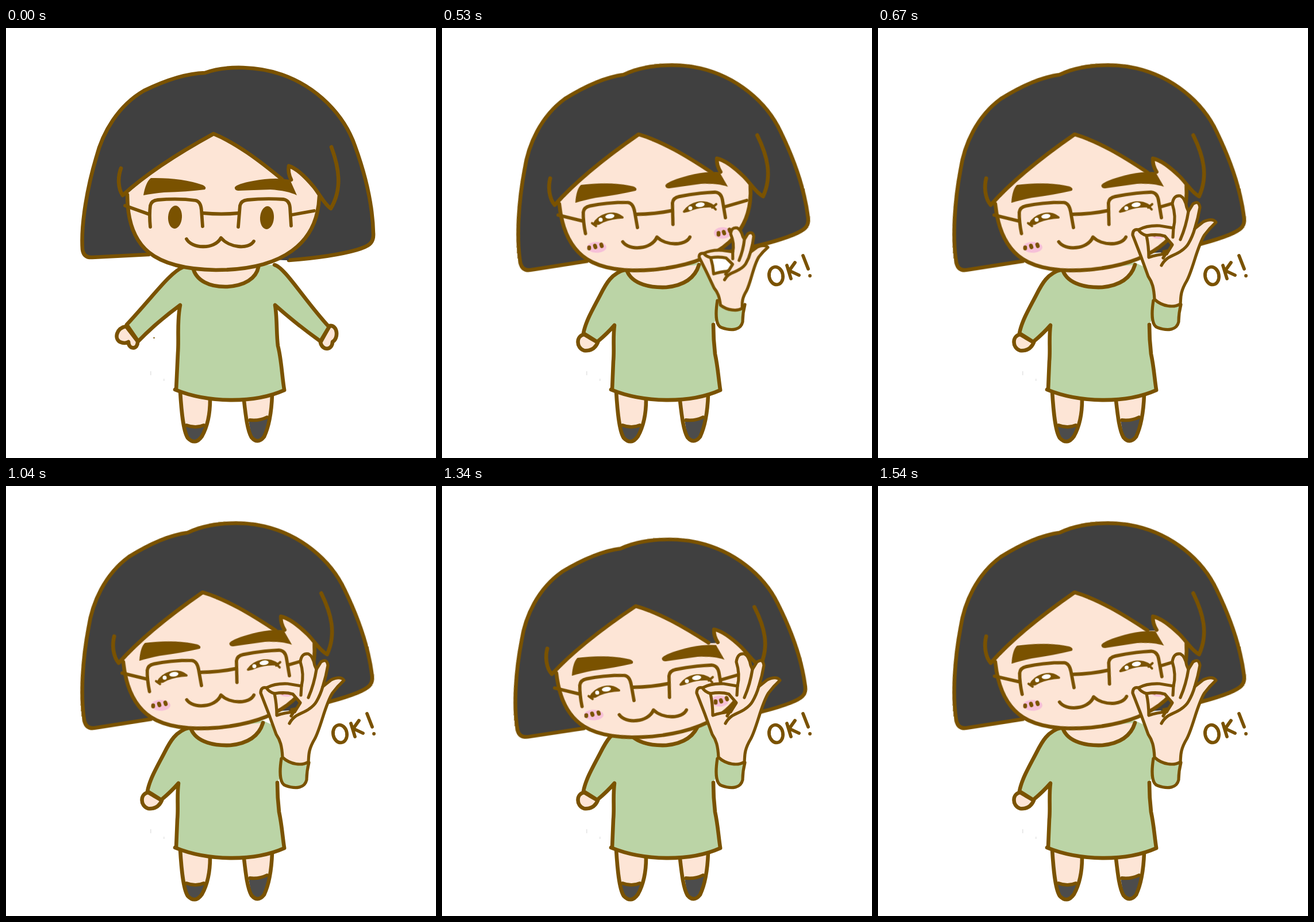
An HTML page without scripts for the animation above (2.14 s loop, 748 px wide and 748 px high).

```html
<!DOCTYPE html>
<html lang="en">
<head>
<meta charset="utf-8">
<title>OK!</title>
<style>
  html, body { margin: 0; width: 100%; height: 100%; overflow: hidden; background: #fff; }
  svg { display: block; width: 100%; height: 100%; }

  :root { --line: #7a5200; --hair: #404040; --skin: #fde5d6; --shirt: #bbd4a6; }
  .ink { fill: none; stroke: var(--line); stroke-width: 6.6; stroke-linecap: round; stroke-linejoin: round; }
  .hair { fill: var(--hair); }
  .skin { fill: var(--skin); }
  .shirt { fill: var(--shirt); }
  .sock { fill: #4c4c4c; }
  .solid { fill: var(--line); }
  .pink { fill: #f6c0d8; }
  .light { fill: #fff; }
  .plain { stroke: none; }
  .thin { stroke-width: 5.8; }
  .fine { stroke-width: 5.2; }
  .lash { stroke-width: 4; }
  .hand path { vector-effect: non-scaling-stroke; }

  .calm, .okay, .tilt, .squash, .nod, .hand { animation: 2140ms step-end infinite; }
  .calm { animation-name: calm; }
  .okay { animation-name: okay; }
  .tilt { animation-name: tilt; transform-origin: 375px 366px; }
  .squash { animation-name: squash; }
  .nod { animation-name: nod; }
  .hand { animation-name: raise; }

  @keyframes calm { 0% { visibility: visible; } 24.766%, 100% { visibility: hidden; } }
  @keyframes okay { 0% { visibility: hidden; } 24.766%, 100% { visibility: visible; } }
  @keyframes tilt { 0% { transform: none; } 24.766%, 100% { transform: translateY(-1.5px) rotate(-6deg); } }
  @keyframes squash {
    0%, 48.598%, 71.962%, 100% { transform: none; }
    39.252%, 62.616% { transform: matrix(1, 0, 0, .964, -5, 30.6); }
  }
  @keyframes nod {
    0%, 48.598% { transform: none; }
    39.252%, 62.616% { transform: translate(-6px, 26px); }
    71.962%, 100% { transform: matrix(1, -.013, .013, 1, -3.5, 8); }
  }
  @keyframes raise {
    0%, 24.766% { transform: matrix(.831, -.006, .048, .745, 62, 133.3); }
    28.037% { transform: matrix(.915, -.003, .024, .872, 31, 66.6); }
    31.308%, 100% { transform: none; }
  }
</style>
</head>
<body>
<svg viewBox="0 0 748 748" role="img" aria-label="A girl with glasses makes an OK sign">
  <g fill="#e4e4e4">
    <rect x="251" y="597" width="1.5" height="7"/>
    <rect x="274" y="610" width="1.5" height="4"/>
  </g>

  <!-- legs -->
  <g class="ink">
    <path class="skin plain" d="M303 634C305 665 308 700 316 713Q329 727 341 710C352 690 355 665 355 645ZM414 645C417 675 420 700 427 712Q438 725 449 711C459 690 462 665 463 636Z"/>
    <path class="sock plain" d="M312 693Q330 698 347 691Q345 704 341 710Q329 727 316 713ZM422 682Q440 685 457 676Q454 702 449 711Q438 725 427 712Z"/>
    <path d="M303 632C305 665 308 700 316 713Q329 727 341 710C352 690 355 665 355 647M414 648C417 675 420 700 427 712Q438 725 449 711C459 690 462 665 463 638"/>
    <path class="thin" d="M314 691Q330 697 344 691M424 682Q440 684 454 677"/>
  </g>

  <!-- arms spread -->
  <g class="ink calm">
    <circle class="solid plain" cx="257.500" cy="539" r="1.2"/>
    <path class="skin" d="M209 519C192 522 188 540 198 546Q207 550 213 546C213 560 230 560 229 545ZM563 518C577 516 579 540 568 546C567 562 550 561 547 547Z"/>
    <path class="shirt plain" d="M308 416C285 425 255 468 210 516L230 545L303 482L296 629C350 652 430 654 484 629L474 555L468 482L547 545L562 520C520 475 485 416 465 412Z"/>
    <path class="skin" d="M325 416C330 440 355 451 385 450C415 448 435 436 439 416"/>
    <path d="M308 416C285 425 255 468 210 516L230 545Q262 512 303 482C297 510 301 540 299 565L296 629M467 412C485 416 520 475 562 520L547 545Q505 515 468 482C472 505 470 530 473 553C479 575 480 605 484 629"/>
  </g>

  <!-- one arm up -->
  <g class="ink okay">
    <path class="skin" d="M247 533C233 536 233 556 247 561Q264 563 271 547Z"/>
    <path class="shirt plain" d="M318 420C295 426 285 445 275 465C262 490 250 510 246 531L270 546L300 517L296 629C350 652 430 654 484 629L474 565L472 515L481 500L478 440L462 415L447 408Z"/>
    <path class="skin" d="M322 423C332 447 365 452 390 451C420 448 440 435 447 412"/>
    <path d="M320 420C295 426 285 445 275 465C262 490 250 510 246 531L270 546Q287 532 300 517C297 540 300 560 298 580L296 629M472 516C472 535 473 550 475 567C480 590 481 610 484 629"/>
    <path class="shirt fine" d="M479 474C475 500 477 518 486 521C505 528 520 525 523 511Q523 496 527 481"/>
  </g>

  <path class="ink" d="M294 629C350 652 430 654 484 630"/>

  <!-- hair and face -->
  <g class="squash"><g class="tilt">
    <g class="ink">
      <path class="hair" d="M248 394L150 399Q135 400 133 385C130 340 142 275 157 225C168 182 195 135 240 109C275 92 310 79 346 78C385 64 440 67 480 81C540 102 588 150 607 205C627 260 638 310 639 358C640 375 630 380 610 386C575 396 530 401 492 404"/>
      <path class="hair plain" d="M248 394L492 404L480 330H260Z"/>
      <path class="skin plain" d="M361 184C400 200 440 230 482 264L497 265L492 240C512 248 530 268 545 293C542 374 482 421 365 421C260 419 211 385 211 288C260 245 310 212 361 184Z"/>
      <path d="M545 293C542 374 482 421 365 421C260 419 211 385 211 290"/>
      <path d="M200 244C194 260 195 280 203 291C250 248 310 212 361 184C400 200 440 230 480 263"/>
      <path d="M566 207C580 245 585 280 565 314C553 306 545 288 535 276C520 258 505 244 492 240Q490 252 496 264"/>
    </g>
    <g class="okay" transform="rotate(6 375 366)">
      <ellipse class="pink" cx="269" cy="383" rx="17" ry="9.500"/>
      <ellipse class="pink" cx="488" cy="358" rx="15" ry="10"/>
      <path class="ink" d="M256 383v2M266 380l1 3M277 378l1 3M481 358v3M490 356l1 3M500 352l1 3"/>
    </g>
  </g></g>

  <!-- features -->
  <g class="nod"><g class="tilt">
    <path class="solid" d="M239 291Q243 268 252 261Q305 260 342 273Q350 277 346 281Q315 285 275 286Q255 288 239 291ZM398 277Q402 271 430 266Q465 259 494 264L506 291Q490 283 460 281Q430 282 404 283Q397 282 398 277Z"/>
    <g class="ink thin">
      <path d="M251 346Q249 325 251 309Q253 300 264 299Q300 296 330 300Q339 302 340 317L342 345M404 346L407 309Q409 300 420 299Q450 296 483 298Q493 300 494 312L496 344"/>
      <path d="M343 322Q375 325 405 322M207 309L249 324M497 325L536 318"/>
      <path d="M314 367C322 383 362 387 374 365C388 382 422 386 431 371"/>
    </g>
    <g class="solid calm">
      <ellipse cx="294" cy="329" rx="12" ry="20" transform="rotate(4 294 329)"/>
      <ellipse cx="454" cy="330" rx="12" ry="20" transform="rotate(4 454 330)"/>
    </g>
    <g class="okay" transform="rotate(6 375 366)">
      <g class="ink lash">
        <path class="solid" d="M264 343C271 328 297 317 314 331Q288 332 272 342ZM261 341L268 346"/>
        <path class="solid" d="M421 321C432 305 456 299 473 312Q450 310 429 319ZM470 314L477 308M472 313L476 317"/>
      </g>
      <g class="light">
        <ellipse cx="292" cy="329" rx="8" ry="4" transform="rotate(-8 292 329)"/>
        <circle cx="276" cy="335" r="3.5"/>
        <ellipse cx="449" cy="309" rx="8" ry="4" transform="rotate(-8 449 309)"/>
        <circle cx="432" cy="315" r="3.5"/>
      </g>
    </g>
  </g></g>

  <!-- raised hand -->
  <g class="okay">
    <g class="ink fine hand">
      <path class="skin" fill-rule="evenodd" d="M481 472C480 452 477 442 470 432C463 412 453 385 443 360Q443 349 453 351Q468 343 490 344L514 348Q519 328 512 306Q514 290 526 292Q534 296 537 312L540 319L548 306Q558 299 560 312Q557 330 551 349L566 337Q582 330 588 338Q577 348 568 360C555 380 548 420 537 440C525 460 527 470 526 480C515 487 495 485 481 472ZM467 361Q486 358 499 362L512 377L502 393Q485 394 471 399Q471 380 467 361Z"/>
      <path d="M453 351Q457 358 467 361M514 347L513 364M540 319Q536 345 526 368M551 349Q547 363 540 375M493 413C502 396 515 397 527 388Q536 382 540 375M501 392L496 400"/>
    </g>
    <g class="ink thin" role="img" aria-label="OK!">
      <ellipse cx="581" cy="431" rx="12" ry="15.500" transform="rotate(-10 581 431)"/>
      <path d="M600 413L607 436M614 408L604 422L621 430M628 396L637 419M640 431h.1"/>
    </g>
  </g>
</svg>
</body>
</html>
```
